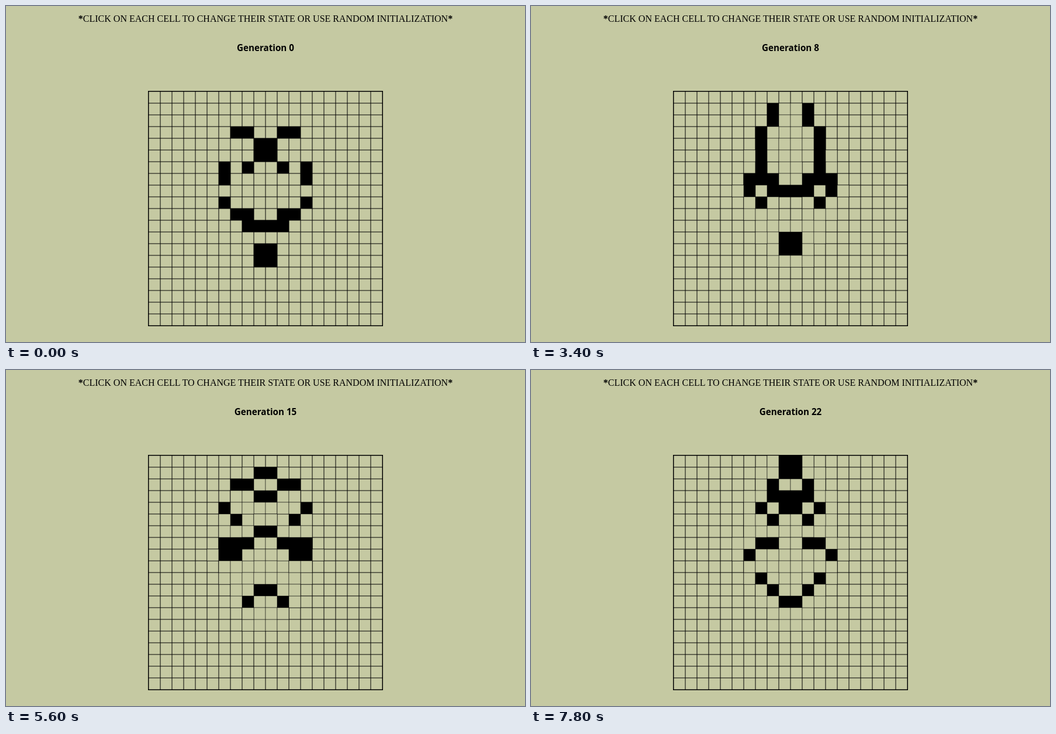
These frames come from a looping animation (888 by 574 pixels, 8000 ms). An HTML page with a canvas:

```html
<!DOCTYPE html>
<html lang="en">
<head>
<meta charset="utf-8">
<title>Game of Life</title>
<style>
  html, body { margin: 0; width: 100%; height: 100%; overflow: hidden; background: #c5c9a2; color: #000; }
  div { position: absolute; left: 0; width: 888px; text-align: center; white-space: nowrap; }
  #hint { top: 13px; font: 16px/18px "Liberation Serif", serif; }
  #label { top: 61px; font: bold 15.2px/20px "Open Sans", sans-serif; }
  canvas { position: absolute; left: 243px; top: 145px; border: 1px solid #000; }
</style>
</head>
<body>
<div id="hint"><b>*</b>CLICK ON EACH CELL TO CHANGE THEIR STATE OR USE RANDOM INITIALIZATION<b>*</b></div>
<div id="label">Generation 0</div>
<canvas id="board" width="400" height="400"></canvas>
<script>
const N = 20, SIZE = 20, LOOP = 8000;
const STEPS = [1200, 1600, 1800, 2200, 2600, 2800, 3200, 3400, 3800, 4000, 4400,
  4600, 5000, 5400, 5600, 6000, 6200, 6600, 6800, 7200, 7400, 7800];
const SEED = [
  '.OO..OO.', '...OO...', '...OO...', 'O.O..O.O', 'O......O', '........',
  'O......O', '.OO..OO.', '..OOOO..', '........', '...OO...', '...OO...'];
const SEED_X = 6, SEED_Y = 3;

const ctx = document.getElementById('board').getContext('2d');
const label = document.getElementById('label');
let cells, generation;

const alive = (x, y) => cells[y]?.[x] ? 1 : 0;

function paint(x, y, on) {
  const box = [x * SIZE, y * SIZE, SIZE, SIZE];
  if (on) return ctx.fillRect(...box);
  ctx.clearRect(...box);
  ctx.lineWidth = 0.5;
  ctx.strokeRect(...box);
}

function reset() {
  generation = 0;
  ctx.clearRect(0, 0, N * SIZE, N * SIZE);
  ctx.lineWidth = 1;
  ctx.beginPath();
  for (let i = 0; i <= N; i++) {
    ctx.moveTo(i * SIZE, 0);
    ctx.lineTo(i * SIZE, N * SIZE);
    ctx.moveTo(0, i * SIZE);
    ctx.lineTo(N * SIZE, i * SIZE);
  }
  ctx.stroke();
  cells = Array.from({ length: N }, (_, y) => Array.from({ length: N }, (_, x) => {
    const on = SEED[y - SEED_Y]?.[x - SEED_X] === 'O';
    if (on) paint(x, y, true);
    return on;
  }));
}

function step() {
  const next = cells.map((row, y) => row.map((on, x) => {
    let count = -alive(x, y);
    for (let dy = -1; dy <= 1; dy++)
      for (let dx = -1; dx <= 1; dx++) count += alive(x + dx, y + dy);
    return count === 3 || (on && count === 2);
  }));
  // Only changed cells are repainted, so dead cells keep a fainter outline.
  next.forEach((row, y) => row.forEach((on, x) => {
    if (on !== cells[y][x]) paint(x, y, on);
  }));
  cells = next;
  generation++;
}

function draw() {
  const time = performance.now() % LOOP;
  const goal = STEPS.filter(t => t <= time).length;
  if (goal < generation) reset();
  while (generation < goal) step();
  label.textContent = 'Generation ' + generation;
  requestAnimationFrame(draw);
}

reset();
draw();
</script>
</body>
</html>
```
